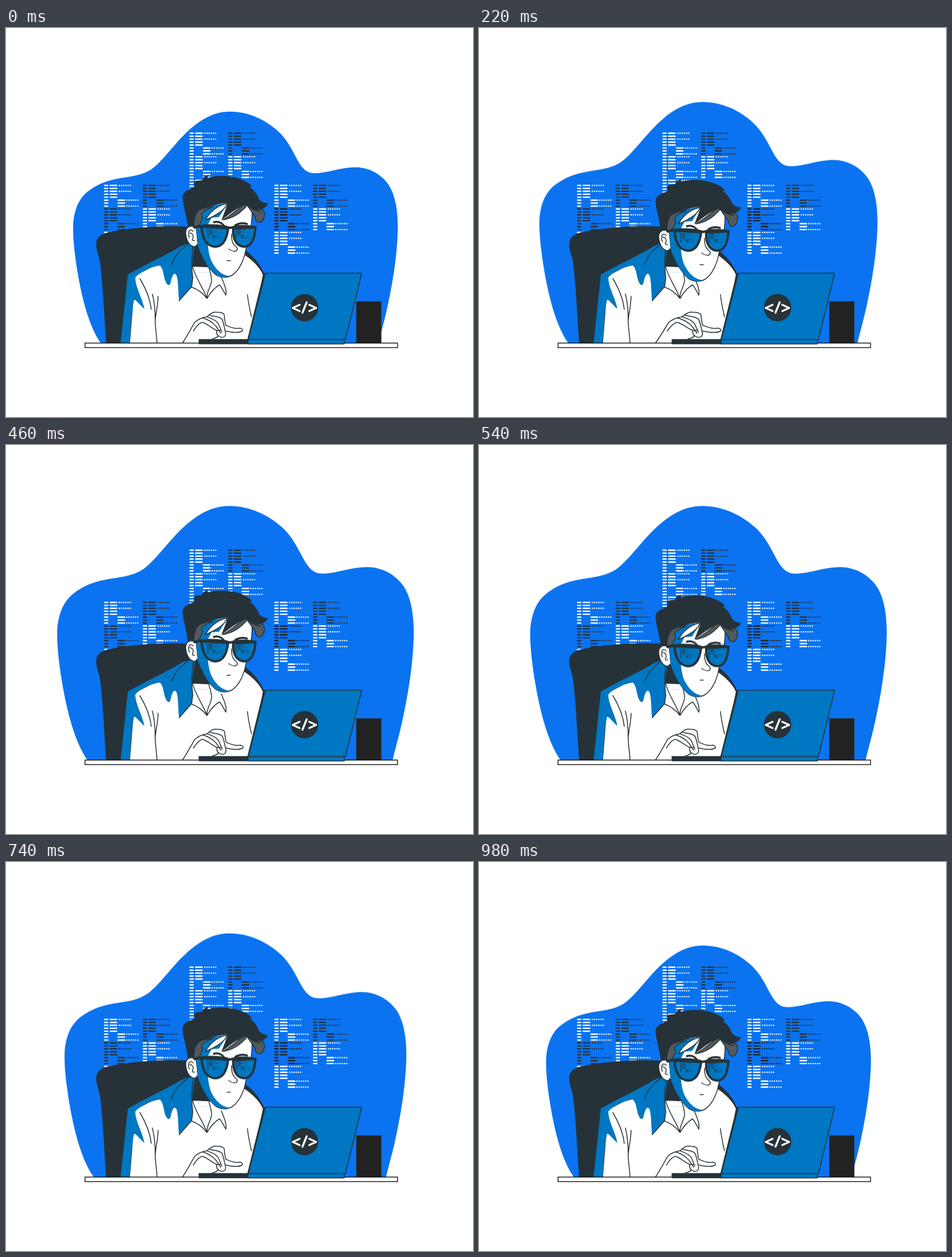
Animation of 820x683 px, one loop 1000 ms. Source, as an HTML page:

```html
<!DOCTYPE html>
<html lang="en">
<head>
<meta charset="utf-8">
<title>Coder at a desk</title>
<style>
  html, body { margin: 0; width: 100%; height: 100%; overflow: hidden; background: #fff; }
  svg { display: block; width: 820px; height: 683px; }
  #blob { transform-origin: 403px 553px; }
  #hand { transform-origin: 310px 553px; }
  .dark { fill: #263238; }
  .blue { fill: #0077c2; }
  .grey { fill: #525a5f; }
  .white { fill: #fff; }
  .line { stroke: #263238; stroke-width: 1.5; stroke-linecap: round; stroke-linejoin: round; }
  .none { fill: none; }
</style>
</head>
<body>
<svg viewBox="0 0 820 683" xmlns="http://www.w3.org/2000/svg">
  <defs>
    <g id="code" fill="none" stroke="currentColor" stroke-width="2.4" stroke-linecap="round">
      <path d="M1.2 0h5.4M1.2 5.2h5.4M1.2 10.3h5.4M1.2 15.5h5.4M1.2 20.7h5.4M1.2 25.8h5.4M1.2 31h5.4M1.2 36.2h5.4"/>
      <path d="M11 0h11.3M11 5.2h11.3M11 10.3h11.3M11 15.5h11.3M11 20.7h11.3M24.8 25.8h11.3M24.8 31h11.3M24.8 36.2h11.3"/>
      <path stroke-dasharray="0 3.86" d="M27 0h19.6M27 10.3h19.6M40 25.8h19.6M40 36.2h19.6"/>
    </g>
  </defs>

  <path id="blob" fill="#0b73f0" d="M167 554C146 525 133 474 125 425C120 394 117 366 118 343C120.500 316 129 299 143 287.500C156 277.500 170 270.500 187 266.500C211 260.500 236 261.500 256 247.500C280 229.500 298 198.500 328 173.500C350 155.500 370 146.800 393 146.800C425 146.800 455 160.500 478 181.500C509 210.500 511 249.500 536 254.500C558 257.500 585 244.500 613 244.500C637 244.500 659 256.500 672 275.500C684 294.500 688 321 688 350C687.500 393 680 442 671 484C666 509 658 536 654 554Z"/>
  <g id="codes"></g>

  <!-- chair -->
  <path class="dark" d="M176 556C173 512 170 449 165 410C162 396 157.500 388 158.500 376C161 364 171 360 188 357C210 353 238 350 265 348.500C285 347.500 305 348 320 349L400 376C424 391 442 405 453.500 432L446 553Z"/>

  <!-- shirt and neck shade -->
  <path class="white" d="M217.500 556L227 435L327 383L328 418L357 420L380 430L418 397C433 407 445 418 451 433L430 552Z"/>
  <path class="dark" d="M325 378L395 378L393 420C390 428 384 431 379 431L357 420L327 419Z"/>
  <path class="blue" d="M201 556C206 510 211 462 214 432C242 416 274 401 299 387C309 380 319 376 332 379C327 404 326 421 328 438L326 454C319 463 312 470 304 479C302 465 303 448 300 436C296 425 291 436 289 447C287 455 282 451 279 442C276 431 276 422 270 417C253 420 237 427 227 438C227 455 239 473 243 493C235 487 230 478 225 477C221 493 218.500 528 217.500 556Z"/>
  <g class="line none">
    <path d="M214 432C242 416 274 401 299 387C309 380 318 377 327 377M320 379C304 391 296 400 291 415M329 381C325 401 326 425 328 439L326 454C319 462 312 470 304 479"/>
    <path d="M326 455C338 459 346 466 353 475C359 464 366 456 375 451C380 457 383 464 386 469C388 459 382 447 378 437M328 419C330 433 342 449 353 474M353 474C352 461 361 454 361 442C360 434 359 428 356 421"/>
    <path d="M235 440C244 455 253 475 255 494M257 467C261 482 262 498 262 514C262 529 265 540 265 553M267 471C267 487 263 499 262 514M424 468C425 481 428 494 431 507M418 397C433 407 445 418 452 433"/>
  </g>
  <path d="M336 429h18" stroke="#b9dcf2" stroke-width=".8"/>

  <g id="hand" class="line">
    <path class="white" d="M310 553C318 541 325 528 331 517C338 511 345 508 353 507C358 502 364 498 370 499C376 499 381 500 383 503C384 510 384 516 386 522C394 525 402 529 410 527C414 527 416 530 415 532C408 536 398 535 386 532C387 536 387 540 384 542C380 543 377 542 374 540C369 546 364 546 359 546L346 554Z" stroke="none"/>
    <path class="none" d="M310 553C318 541 325 528 331 517C338 511 345 508 353 507C358 502 364 498 370 499C376 499 381 500 383 503C384 510 384 516 386 522C394 525 402 529 410 527C414 527 416 530 415 532C408 536 398 535 386 532"/>
    <path class="none" d="M329 532C334 524 340 516 346 517C356 521 362 528 370 531C369 536 371 541 378 543C384 544 387 539 385 533C383 525 382 516 379 511C374 506 364 507 357 504M345 509C356 512 363 517 369 524L377 536M353 507C363 511 371 514 374 522L379 534M370 531L378 531M362 546C367 545 371 543 373 540"/>
  </g>

  <g id="head">
    <path class="white line" d="M334 352C325 344 316 349 315.500 359C316 372 322 384 332 384L337 379Z"/>
    <path class="none line" d="M329 357C321 350 319 360 322 368M323 360C329 361 330 366 327 372C329 374 330 374 331 373"/>
    <path class="white line" d="M334 330L345 312L420 302L432 320C433 340 427 372 421 389C419 403 411 425 397 434C387 440 376 438 368 433C353 420 344 402 337 381Z"/>
    <path class="blue" d="M334 348L344 314L390 307L374 332L361 333L354 346C353 366 354 390 359 405C366 422 378 434 392 435.500C383 440 374 437 367 432C353 420 343 400 336 380Z"/>
    <path class="white line" stroke-width="1" d="M350 337C356 327 366 313 388 308C386 317 374 327 350 337Z"/>
    <path class="grey line" d="M330 350C329 340 331 330 336 322C344 316 355 314 364 314C352 318 344 322 343 329C348 334 343 334 342 341C340 346 337 348 330 350ZM381 337C392 330 404 321 418 309L424 311C414 322 404 331 389 335Z"/>
    <path class="grey line" d="M429 313L451 319C456 325 454 337 447 341C441 342 437 337 438 332L424 312Z"/>
    <path class="dark" d="M319 349C318 329 310 313 310 295C312 286 322 283 332 279C328 273 331 267 338 268L345 267C345 262 350 260 356 258C352 262 354 264 359 262C374 258 397 260 411 265C422 269 430 274 432 279L427 279C436 284 441 292 444 300C448 306 455 308 460 307.500C457 316 449 319 441 319L450 323C439 323 430 318 423 310C411 312 397 323 378 338C383 325 387 316 389 307C374 307 358 314 345 317C335 321 331 331 330 348C325 346 322 347 319 349Z"/>
    <path class="none" stroke="#263238" stroke-width="3.500" stroke-linecap="round" d="M365 341C371 339 378 341 382 346M403 346C410 342 417 342 423 344"/>
    <path class="none line" d="M396 362C396 374 398 380 404 384C408 388 406 392 401 392C397 392 394 390 391 388M388 408.500L394 408.500"/>
    <path class="blue" stroke="#263238" stroke-width="4" stroke-linejoin="round" d="M343 349C358 350 377 350 390 352C388 368 382 384 367 384C350 383 345 367 343 349ZM399 352L438 350C437 366 433 384 418 384C403 383 398 368 399 352Z"/>
    <path class="none" stroke="#263238" stroke-width="4.500" stroke-linecap="round" stroke-linejoin="round" d="M331 350C347 346 367 346 386 349C392 352 396 351 401 349C414 347 427 348 438 350"/>
    <g color="#263238">
      <use href="#code" transform="translate(353 354) scale(.4)"/>
      <use href="#code" transform="translate(403 354) scale(.4)"/>
    </g>
  </g>

  <!-- desk things -->
  <rect x="615.500" y="480.500" width="43" height="73" fill="#222" stroke="#263238" stroke-width="1.500"/>
  <rect x="138.700" y="553.200" width="548.800" height="8" fill="#fff" stroke="#111" stroke-width="1.400"/>
  <path class="dark line" d="M339 547H425V554.500H339Z"/>
  <path class="dark line" d="M453 431H460L430 547H424.500Z"/>
  <path class="blue line" d="M455.500 430.500H624.500L596 547H425.500ZM425 547H594V554.800H425Z"/>
  <circle class="dark" cx="524.300" cy="491" r="24"/>
  <path class="none" stroke="#fff" stroke-width="3.400" stroke-linecap="round" stroke-linejoin="round" d="M515.500 486L503.500 491.500L515.500 497M528 481.500L520.500 500M532.500 486L544.500 491.500L532.500 497"/>
</svg>
<script>
const byId = id => document.getElementById(id);
const light = '#fff', dark = '#263238', step = 41.3;

// column x, first y, colours from top to bottom
const columns = [
  [172, 276.4, light, dark, light],
  [240, 276.4, dark, light],
  [322, 184.8, light, light, light],
  [390, 184.8, dark, light],
  [471, 276.4, light, '#222', light],
  [539, 276.4, dark, light]
];
byId('codes').innerHTML = columns.map(([x, y, ...tones]) =>
  tones.map((tone, i) => `<use href="#code" x="${x}" y="${y + i * step}" color="${tone}"/>`).join('')
).join('');

const smooth = 'cubic-bezier(.333,0,.667,1)';
const outSine = 'cubic-bezier(.39,.575,.565,1)';
const inSine = 'cubic-bezier(.47,0,.745,.715)';

// steps: [offset, transform, easing]
function loop(id, steps) {
  const frames = steps.map(([offset, transform, easing = smooth]) => ({ offset, transform, easing }));
  const run = byId(id).animate(frames, { duration: 1000, iterations: Infinity });
  run.startTime = 0;
}

loop('blob', [[0, 'scale(1)'], [.5, 'scale(1.1)'], [1, 'scale(1)']]);
loop('head', [0, 7.5, -7.5, 7.5, -7.5, 0].map((y, i) => [i / 5, `translateY(${y}px)`]));
loop('hand', [
  [0, 'scaleX(1)', outSine],
  [.24, 'scaleX(1.09)', inSine],
  [.48, 'scaleX(1)'],
  [1, 'scaleX(1)']
]);
</script>
</body>
</html>
```
